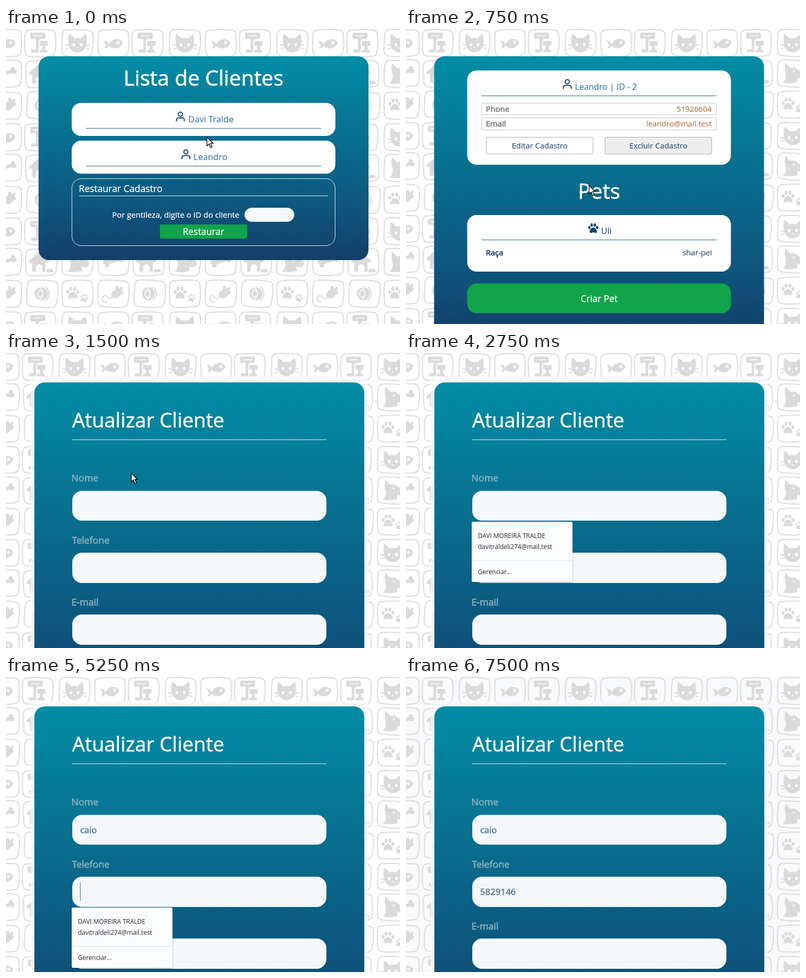
An HTML page that plays this animation: 750 px wide and 565 px high, repeating every 8 s.

```html
<!DOCTYPE html>
<html lang="pt-BR">
<head>
<meta charset="utf-8">
<title>Lista de Clientes</title>
<style>
html, body { margin: 0; width: 100%; height: 100%; overflow: hidden; background: #fff; }
svg { display: block; width: 750px; height: 565px; font-family: "Open Sans", "Noto Sans", sans-serif; }
text { --c: #fff; fill: var(--c); stroke: var(--c); stroke-width: .25px; font-size: 15.1px; white-space: pre; }
.mid { text-anchor: middle; }
.end { text-anchor: end; }
.h1 { font-size: 40.3px; stroke-width: .7px; }
.h2 { font-size: 38.2px; stroke-width: .6px; }
.md { font-size: 17.4px; }
.lg { font-size: 17.8px; }
.name { font-size: 16.7px; --c: #33749c; stroke-width: .1px; }
.who { font-size: 16.1px; --c: #33749c; stroke-width: .1px; }
.key { font-size: 15px; --c: #777; stroke-width: .6px; }
.btn { font-size: 14.8px; --c: #2b4a6c; stroke-width: .1px; }
.val { font-size: 14.7px; --c: #b5713f; stroke-width: .1px; }
.label { font-size: 18px; --c: #86aeba; stroke-width: .7px; }
.typed { font-size: 17px; --c: #667f97; stroke-width: .7px; }
.small { font-size: 12px; --c: #23262a; stroke-width: 0; }
.white { --c: #fff; }
.navy { --c: #173f66; }
.icon { fill: none; stroke: #11426d; stroke-width: 2; stroke-linecap: round; }
.rule { stroke: #24667f; }
.line { stroke: #e4eff3; }
.card { fill: url(#sea); }
.field { fill: #fff; stroke: #bfc3c5; }
.input { fill: #f4f8fb; stroke: #dfe9ee; }
.green { fill: #11a44a; }
.art { fill: #dadada; }
.stroke { fill: none; stroke: #d8d8d8; stroke-width: 2; stroke-linecap: round; }
.gap { fill: #fff; }
.cut { fill: none; stroke: #fff; stroke-width: 1.6; }

.t { animation: 8s step-end infinite; visibility: hidden; }
.page { animation: tint 8s step-end infinite; }
.wide { animation-name: wide; }
.slim { animation-name: slim; }
.list { animation-name: list; }
.blank { animation-name: blank; }
.full { animation-name: full; }
.hover { animation-name: hover; }
.form { animation-name: form; }
.menu { animation-name: menu; }
.caret { animation-name: caret; }
.arrow { animation-name: arrow; }
.hand { animation-name: hand; }
.beam { animation-name: beam; }
.n1 { animation-name: n1; }
.n2 { animation-name: n2; }
.d1 { animation-name: d1; }
.d2 { animation-name: d2; }
.d3 { animation-name: d3; }

@keyframes tint { 0% { fill: #fff } 93.75%, 100% { fill: #f9fafc } }
@keyframes wide { 0% { visibility: visible } 9.375%, 100% { visibility: hidden } }
@keyframes slim { 0% { visibility: hidden } 9.375%, 100% { visibility: visible } }
@keyframes list { 0% { visibility: visible } 6.25%, 100% { visibility: hidden } }
@keyframes blank { 0% { visibility: hidden } 6.25% { visibility: visible } 9.375%, 100% { visibility: hidden } }
@keyframes full { 0% { visibility: hidden } 9.375% { visibility: visible } 18.75%, 100% { visibility: hidden } }
@keyframes hover { 0% { visibility: hidden } 12.5% { visibility: visible } 18.75%, 100% { visibility: hidden } }
@keyframes form { 0% { visibility: hidden } 18.75%, 100% { visibility: visible } }
@keyframes n1 { 0% { visibility: hidden } 43.75%, 100% { visibility: visible } }
@keyframes n2 { 0% { visibility: hidden } 46.875%, 100% { visibility: visible } }
@keyframes d1 { 0% { visibility: hidden } 71.875%, 100% { visibility: visible } }
@keyframes d2 { 0% { visibility: hidden } 75%, 100% { visibility: visible } }
@keyframes d3 { 0% { visibility: hidden } 87.5%, 100% { visibility: visible } }
@keyframes menu {
  0% { visibility: hidden; opacity: 1; transform: none }
  28.125% { visibility: visible; opacity: 1; transform: none }
  43.75% { visibility: visible; opacity: .4; transform: none }
  46.875% { visibility: hidden; opacity: 1; transform: none }
  65.625% { visibility: visible; opacity: 1; transform: translate(0, 118px) }
  71.875% { visibility: visible; opacity: .4; transform: translate(0, 118px) }
  75%, 100% { visibility: hidden; opacity: 1; transform: none }
}
@keyframes caret {
  0% { visibility: hidden; transform: translate(141px, 276px) }
  28.125% { visibility: visible; transform: translate(141px, 276px) }
  34.375% { visibility: hidden; transform: translate(141px, 276px) }
  40.625% { visibility: visible; transform: translate(141px, 276px) }
  43.75% { visibility: visible; transform: translate(159px, 276px) }
  46.875% { visibility: visible; transform: translate(176px, 276px) }
  56.25% { visibility: hidden; transform: translate(176px, 276px) }
  65.625% { visibility: visible; transform: translate(141px, 394px) }
  71.875% { visibility: visible; transform: translate(160px, 394px) }
  75% { visibility: visible; transform: translate(189px, 394px) }
  81.25% { visibility: hidden; transform: translate(189px, 394px) }
  87.5% { visibility: visible; transform: translate(209px, 394px) }
  93.75%, 100% { visibility: hidden; transform: translate(209px, 394px) }
}
@keyframes arrow {
  0% { visibility: visible; transform: translate(382px, 208px) }
  3.125% { visibility: hidden; transform: translate(382px, 208px) }
  6.25% { visibility: visible; transform: translate(372px, 245px) }
  9.375% { visibility: visible; transform: translate(348px, 300px) }
  12.5% { visibility: hidden; transform: translate(348px, 300px) }
  18.75% { visibility: visible; transform: translate(238px, 231px) }
  21.875% { visibility: visible; transform: translate(227px, 224px) }
  25% { visibility: hidden; transform: translate(227px, 224px) }
  56.25% { visibility: visible; transform: translate(212px, 363px) }
  59.375% { visibility: visible; transform: translate(192px, 372px) }
  62.5%, 100% { visibility: hidden; transform: translate(192px, 372px) }
}
@keyframes hand {
  0% { visibility: hidden; transform: translate(368px, 245px) }
  3.125% { visibility: visible; transform: translate(368px, 245px) }
  6.25% { visibility: hidden; transform: translate(368px, 245px) }
  12.5% { visibility: visible; transform: translate(225px, 232px) }
  15.625% { visibility: visible; transform: translate(237px, 223px) }
  18.75%, 100% { visibility: hidden; transform: translate(237px, 223px) }
}
@keyframes beam {
  0% { visibility: hidden; transform: translate(172px, 309px) }
  25% { visibility: visible; transform: translate(172px, 309px) }
  28.125% { visibility: hidden; transform: translate(172px, 309px) }
  62.5% { visibility: visible; transform: translate(198px, 417px) }
  65.625%, 100% { visibility: hidden; transform: translate(198px, 417px) }
}
</style>
</head>
<body>
<svg viewBox="0 0 750 565" xmlns="http://www.w3.org/2000/svg">
<defs>
  <linearGradient id="sea" x1="0" y1="0" x2="0" y2="1">
    <stop offset="0" stop-color="#028da5"/>
    <stop offset=".75" stop-color="#0e557d"/>
    <stop offset="1" stop-color="#133e69"/>
  </linearGradient>
  <filter id="soft" x="-10%" y="-10%" width="120%" height="125%">
    <feDropShadow dx="0" dy="1" stdDeviation="1.5" flood-opacity=".35"/>
  </filter>

  <path id="tile" class="stroke" d="M-21 -25Q0 -27 21 -25Q29 -24 29 -15Q31 0 28 16Q27 25 18 25Q0 27 -20 25Q-28 25 -29 15Q-30 0 -29 -16Q-28 -25 -21 -25Z"/>
  <g id="paw">
    <path d="M0 -1C4 -1 7 4 7 7C7 10 3 9 0 8C-3 9 -7 10 -7 7C-7 4 -4 -1 0 -1Z"/>
    <ellipse cx="-7.5" cy="-1" rx="2.2" ry="3"/><ellipse cx="-3" cy="-6" rx="2.3" ry="3.2"/>
    <ellipse cx="3" cy="-6" rx="2.3" ry="3.2"/><ellipse cx="7.5" cy="-1" rx="2.2" ry="3"/>
  </g>
  <g id="tower">
    <path d="M-18 -20H9Q11 -14 9 -8H-1V12H4V18H-17V12H-8V-8H-18Q-20 -14 -18 -20Z"/>
    <path class="gap" d="M-3 -6H17V20H-3Z"/>
    <path d="M-1 -4H15V5H10V13H14V18H-1V13H4V5H-1Z"/>
    <path class="cut" d="M-13 -14H4"/>
  </g>
  <g id="cat">
    <path d="M-16 -18Q-10 -14 -6 -9Q0 -11 6 -9Q10 -14 16 -18Q19 -8 17 2Q14 17 0 18Q-14 17 -17 2Q-19 -8 -16 -18Z"/>
    <path class="stroke" d="M-16 5L-22 3M-16 9L-22 11M16 5L22 3M16 9L22 11"/>
    <ellipse class="gap" cx="-7" cy="3" rx="2.4" ry="3.2"/><ellipse class="gap" cx="7" cy="3" rx="2.4" ry="3.2"/>
    <path class="gap" d="M-2 8H2L0 11Z"/>
  </g>
  <g id="fish">
    <path d="M-9 2Q-3 -8 7 -8Q16 -7 18 -1Q15 9 4 10Q-4 10 -9 5Q-12 12 -17 9Q-14 5 -15 1Q-19 -2 -17 -5Q-11 -4 -9 2Z"/>
    <circle class="gap" cx="9" cy="-1" r="3"/><circle cx="9.500" cy="-1" r="1.300"/>
  </g>
  <g id="house">
    <path d="M-24 -2L-5 -19L15 -3L12 1L8 -1V18H-17V0L-21 2Z"/>
    <path class="gap" d="M-10 18V8Q-4 -1 2 8V18Z"/>
    <path d="M11 13H22L24 19H9Z"/>
  </g>
  <g id="dog">
    <path d="M-14 -21L-5 -11Q4 -14 10 -7L22 -2Q24 5 18 9L8 9L9 17Q-6 20 -19 18Q-10 8 -14 -2Q-17 -12 -14 -21Z"/>
    <circle class="gap" cx="2" cy="-4" r="1.800"/>
  </g>
  <path id="bone" d="M-10 -3L9 -7Q8 -14 14 -13Q18 -12 17 -8Q22 -6 20 -2Q16 3 11 -1L-7 4Q-7 11 -13 11Q-18 10 -16 5Q-21 4 -20 -1Q-16 -7 -10 -3Z"/>
  <g id="ball">
    <circle cx="-2" cy="0" r="12.500"/>
    <path class="cut" d="M-5 -12Q7 0 -5 12"/><path class="stroke" d="M7 -13Q19 0 7 13"/>
    <ellipse class="cut" cx="-4" cy="0" rx="5" ry="7"/>
  </g>
  <g id="paws">
    <use href="#paw" transform="translate(-9 -2) scale(1.25)"/>
    <use href="#paw" transform="translate(13 8) rotate(15) scale(.8)"/>
  </g>
  <g id="mouse">
    <path d="M-4 4Q-4 -5 5 -8Q2 -14 7 -15Q11 -14 11 -9L16 -14Q20 -11 16 -6Q21 -4 18 0Q12 2 10 7Q2 12 -4 4Z"/>
    <path class="stroke" d="M-2 6Q-7 13 -11 7Q-16 0 -20 7Q-24 16 -12 16"/>
  </g>
  <pattern id="pets" x="34" y="0" width="204.400" height="179.600" patternUnits="userSpaceOnUse">
    <g class="art">
      <g transform="translate(31 29)"><use href="#tile"/><use href="#tower"/></g>
      <g transform="translate(102 29)"><use href="#tile" transform="rotate(2)"/><use href="#cat"/></g>
      <g transform="translate(170.500 29)"><use href="#tile" transform="rotate(-1)"/><use href="#fish"/></g>
      <g transform="translate(33 88)"><use href="#tile" transform="rotate(-2)"/><use href="#house"/></g>
      <g transform="translate(102 88)"><use href="#tile" transform="rotate(3)"/><use href="#dog"/></g>
      <g transform="translate(170.500 87)"><use href="#tile"/><use href="#bone"/></g>
      <g transform="translate(35 148)"><use href="#tile" transform="rotate(3)"/><use href="#ball"/></g>
      <g transform="translate(102 148)"><use href="#tile" transform="rotate(-1)"/><use href="#paws"/></g>
      <g transform="translate(170.500 148)"><use href="#tile" transform="rotate(2)"/><use href="#mouse"/></g>
    </g>
  </pattern>

  <g id="user" class="icon"><circle cy="-4.500" r="4"/><path d="M-7.500 8.500V6.500A4 4 0 0 1 -3.500 2.500H3.500A4 4 0 0 1 7.500 6.500V8.500"/></g>
  <g id="info">
    <rect x="125" y="81" width="502" height="180" rx="18" fill="#fff"/>
    <path class="rule" d="M152 129.500H600"/>
    <rect class="field" x="152.500" y="143.500" width="447" height="22" rx="2"/>
    <rect class="field" x="152.500" y="171.500" width="447" height="23" rx="2"/>
    <text class="key" x="160.500" y="160">Phone</text>
    <text class="key" x="160.500" y="188">Email</text>
    <rect x="161.500" y="208.500" width="203" height="32" rx="2" fill="#fff" stroke="#a9abad"/>
    <rect x="387.500" y="208.500" width="203" height="32" rx="2" fill="#eee" stroke="#a9abad"/>
    <text class="btn mid" x="263" y="230">Editar Cadastro</text>
    <text class="btn mid" x="489" y="230">Excluir Cadastro</text>
    <text class="h1 mid" x="376" y="326">Pets</text>
  </g>
  <g id="create">
    <rect class="green" x="125" y="375" width="502" height="57" rx="18"/>
    <text class="md mid" x="376" y="410">Criar Pet</text>
  </g>
</defs>

<rect class="page" width="750" height="565" fill="#fff"/>
<rect class="t wide" width="750" height="565" fill="url(#pets)"/>
<rect class="t slim" x="-10" width="790" height="580" fill="url(#pets)" transform="translate(-4 0) scale(.988)"/>

<g class="t list">
  <rect class="card" x="62" y="54" width="628" height="389" rx="20"/>
  <text class="h1 mid" x="376" y="110">Lista de Clientes</text>
  <rect x="125" y="143" width="502" height="63" rx="18" fill="#fff"/>
  <use href="#user" x="332" y="169"/>
  <text class="name" x="347" y="180">Davi Tralde</text>
  <path class="rule" d="M152 191.500H600"/>
  <rect x="125" y="215" width="502" height="63" rx="18" fill="#fff"/>
  <use href="#user" x="342.500" y="241"/>
  <text class="name" x="357" y="252">Leandro</text>
  <path class="rule" d="M152 263.500H600"/>
  <rect class="line" x="125.500" y="287.500" width="501" height="128" rx="18" fill="none"/>
  <text class="lg" x="138.500" y="313">Restaurar Cadastro</text>
  <path class="line" d="M139 320.500H613"/>
  <text x="202" y="362">Por gentileza, digite o ID do cliente</text>
  <rect class="input" x="454.500" y="343.500" width="94" height="26" rx="13"/>
  <rect class="green" x="293" y="375" width="166" height="27" rx="3"/>
  <text class="md mid" x="376" y="395">Restaurar</text>
</g>

<g class="t blank">
  <rect class="card" x="62" y="54" width="628" height="428" rx="20"/>
  <use href="#info"/>
  <use href="#user" x="356" y="107"/>
  <text class="who" x="368" y="118">| ID -</text>
  <use href="#create"/>
</g>

<g class="t full" transform="translate(-8.500 0)">
  <rect class="card" x="62" y="54" width="628" height="541" rx="20"/>
  <use href="#info"/>
  <use href="#user" x="315.500" y="107"/>
  <text class="who" x="330" y="118">Leandro | ID - 2</text>
  <text class="val end" x="590.500" y="160">51926604</text>
  <text class="val end" x="590.500" y="188">leandro@mail.test</text>
  <g class="t hover">
    <rect x="161" y="208.500" width="203" height="32" rx="2" fill="#bdb9b9" stroke="#a19e9e"/>
    <text class="btn mid white" x="263" y="230">Editar Cadastro</text>
  </g>
  <rect x="125" y="357" width="502" height="108" rx="18" fill="#fff"/>
  <use href="#paw" x="365" y="382" fill="#11426d"/>
  <text class="who navy" x="380" y="393">Uli</text>
  <path class="rule" d="M152 404.500H600"/>
  <text class="key navy" x="160.500" y="434">Raça</text>
  <text class="btn end" x="591" y="434">shar-pei</text>
  <use href="#create" y="112.500"/>
</g>

<g class="t form">
  <rect x="47" y="47" width="642" height="530" rx="6" fill="#f7f9fb" opacity=".7"/>
  <rect class="card" x="54" y="58" width="628" height="634" rx="20"/>
  <text class="h2" x="126" y="144">Atualizar Cliente</text>
  <path class="line" d="M126 167.500H610"/>
  <text class="label" x="124.500" y="247">Nome</text>
  <rect class="input" x="126.500" y="265.500" width="483" height="56" rx="18"/>
  <text class="label" x="125.500" y="366">Telefone</text>
  <rect class="input" x="126.500" y="383.500" width="483" height="57" rx="18"/>
  <text class="label" x="124.500" y="484">E-mail</text>
  <rect class="input" x="126.500" y="501.500" width="483" height="57" rx="18"/>
</g>
<text class="typed" x="141" y="300"><tspan class="t n1">ca</tspan><tspan class="t n2">io</tspan></text>
<text class="typed" x="141" y="418"><tspan class="t d1">58</tspan><tspan class="t d2">291</tspan><tspan class="t d3">46</tspan></text>
<rect class="t caret" width="1" height="35" fill="#4f7288"/>

<g class="t menu">
  <rect x="125" y="324" width="192" height="115" rx="3" fill="#fcfdfe" filter="url(#soft)"/>
  <text class="small" x="137" y="355">DAVI MOREIRA TRALDE</text>
  <text class="small" x="137" y="376">davitraldeli274@mail.test</text>
  <path d="M125 398.500H317" stroke="#dcdfe2"/>
  <text class="small" x="137" y="424">Gerenciar...</text>
</g>

<path class="t arrow" d="M.5 .5V17L4.500 13.200L7.500 20.300L10.300 19L7.300 12.200H12.200Z" fill="#fff" stroke="#000" stroke-width="1.300"/>
<g class="t hand" stroke="#000" stroke-width="1.200" stroke-linejoin="round">
  <path fill="#fff" d="M5 15V2.500Q5 1 6.500 1T8 2.500V8Q10.500 6.500 11 9Q13.500 8 14 10.200Q16.500 9.500 16.500 12V17Q16 19 14.500 20.500V23.500H6.500V21Q4 18 1 13.500Q.5 11.500 2.500 11.500Q4 12.500 5 15Z"/>
  <path fill="none" d="M8 8V12M11 9V12.500M14 10.200V13"/>
</g>
<path class="t beam" fill="none" stroke="#111" d="M-3.500 -8.500H-1L.5 -7.500L2 -8.500H4.500M.5 -7.500V7.500M-3.500 8.500H-1L.5 7.500L2 8.500H4.500"/>
</svg>
</body>
</html>
```
